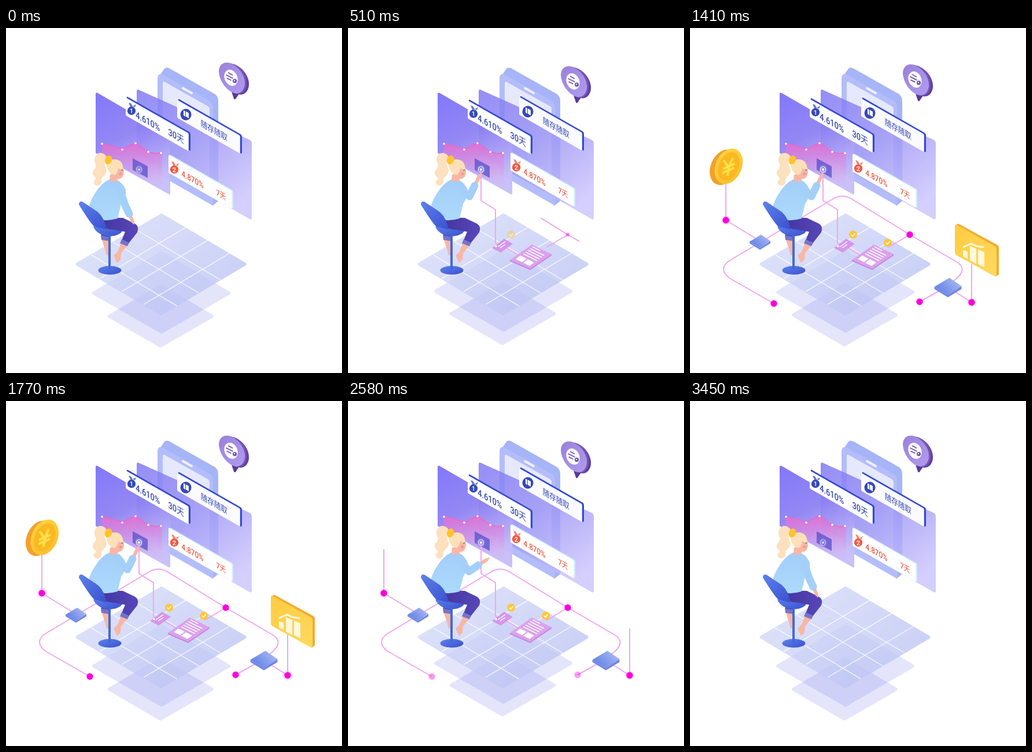
Write an HTML page that moves like this. It is 581x596 px and loops after 3480 ms.

```html
<!DOCTYPE html>
<html lang="zh">
<head>
<meta charset="utf-8">
<title>Isometric finance scene</title>
<style>
  html, body { margin: 0; width: 100%; height: 100%; overflow: hidden; background: #fff; }
  svg { display: block; width: 581px; height: 596px; }
  text { font-family: Roboto, "Noto Sans CJK SC", "Noto Sans CJK", sans-serif; font-weight: 500; }
  .line { fill: none; stroke: #f1a6ef; stroke-width: 2; stroke-linejoin: round; stroke-dasharray: 1 2; }
  .layer { fill: #747bee; stroke: #747bee; opacity: .19; stroke-linejoin: round; stroke-width: 6; }
  .dot { fill: #fb00df; }
  .halo { fill: #d84fd6; }
  .white { fill: none; stroke: #fff; }
  .blue { fill: #3549b8; }
  .red { fill: #f05b45; }
  .skin { fill: #f8b7a5; }
</style>
</head>
<body>
<svg viewBox="0 0 581 596">
  <defs>
    <linearGradient id="floor" x1="0" y1="0" x2="1" y2=".6"><stop stop-color="#d6ddfa"/><stop offset="1" stop-color="#bbc3f3"/></linearGradient>
    <linearGradient id="front" x1="0" y1="0" x2=".35" y2="1"><stop stop-color="#7b6ffa"/><stop offset=".5" stop-color="#8d80f3"/><stop offset="1" stop-color="#c5bdf8"/></linearGradient>
    <linearGradient id="back" x1="0" y1="0" x2=".7" y2="1"><stop stop-color="#7d74f3"/><stop offset=".5" stop-color="#9a92f5"/><stop offset="1" stop-color="#cbc4fc"/></linearGradient>
    <linearGradient id="pink" x1="0" y1="0" x2="0" y2="1"><stop stop-color="#e86bce" stop-opacity=".85"/><stop offset="1" stop-color="#e9a3e6" stop-opacity="0"/></linearGradient>
    <linearGradient id="bubble" x1="0" y1="0" x2="1" y2="1"><stop stop-color="#9a80dc"/><stop offset="1" stop-color="#b19cee"/></linearGradient>
    <linearGradient id="bubbleSide" x1="0" y1="0" x2="1" y2="1"><stop stop-color="#8667c9"/><stop offset="1" stop-color="#58399a"/></linearGradient>
    <linearGradient id="chip" x1="1" y1="0" x2="0" y2=".6"><stop stop-color="#b3c1f8"/><stop offset="1" stop-color="#6482e4"/></linearGradient>
    <linearGradient id="shirt" x1="0" y1="0" x2="0" y2="1"><stop stop-color="#a3cdf8"/><stop offset="1" stop-color="#acdafd"/></linearGradient>
    <linearGradient id="chair" x1="0" y1="0" x2="1" y2="1"><stop stop-color="#5c82ec"/><stop offset="1" stop-color="#3b50ce"/></linearGradient>
    <linearGradient id="pants" x1="0" y1="0" x2="1" y2="0"><stop stop-color="#42359f"/><stop offset="1" stop-color="#5846b8"/></linearGradient>
    <linearGradient id="gold" x1="0" y1="0" x2="1" y2="1"><stop stop-color="#ffd544"/><stop offset="1" stop-color="#fdbd2c"/></linearGradient>
    <linearGradient id="tile" x1="0" y1="0" x2="1" y2="1"><stop stop-color="#ffcc40"/><stop offset="1" stop-color="#ffd95f"/></linearGradient>
    <path id="balloon" d="M368 75C368 62 379 56 391 62C405 69 414 84 413 97C412 109 403 116 393 112C379 106 369 90 368 75Z"/>
    <g id="check"><circle r="7" fill="#ffc83b"/><path class="white" stroke-width="1.6" d="M-3 0l2.5 2.5 4-5"/></g>
    <g id="block">
      <path fill="#6f86e0" d="M-18 0L0 11L18 -1V3L0 14L-18 3Z"/>
      <path fill="url(#chip)" d="M-18 0L2 -12L18 -1L0 11Z"/>
    </g>
    <g id="medal">
      <path d="M-5 -14l4 1 3 5-3 3zM2 -8l6-3-2 5z" opacity=".75"/>
      <circle r="7.2"/>
    </g>
  </defs>

  <!-- floor -->
  <path class="layer" data-bob="-7" d="M268 446L356 498L267 549L179 498Z"/>
  <path class="layer" data-bob="-5" d="M269 389L385 458L269 525L152 458Z"/>
  <path fill="url(#floor)" stroke="url(#floor)" opacity=".76" stroke-linejoin="round" stroke-width="6" d="M269 323.500L412.500 408L268 493.500L123.500 408Z"/>
  <path id="grid" class="white" stroke-width="1.300" opacity=".85"/>

  <!-- phone and panels -->
  <path fill="#a6b4f8" d="M262 88L274 70Q278 67 283 70L361 114Q367 118 367 126V299L357 307L340 290Z"/>
  <path fill="#b3bdfa" d="M262 89Q262 76 272 81L351 125Q358 129 358 138V307L262 252Z"/>
  <path fill="#e6e9fd" d="M271 95Q271 92 274 93L349 135Q352 137 352 141V285L271 240Z"/>
  <path d="M306 104L321 112.500" stroke="#eef0ff" stroke-width="4" stroke-linecap="round"/>
  <path fill="url(#back)" opacity=".82" d="M226 109Q226 105 230 107L421 193Q425 195 425 199V328Q425 332 421 330L226 218Z"/>
  <path fill="url(#front)" opacity=".94" d="M155 114Q155 111 158 112L281 183Q284 185 284 188V285Q284 289 281 287L155 216Z"/>
  <path fill="url(#pink)" d="M166 200L185 204L201 209L224 198L246 214L258 217L270 215V279L166 219Z"/>
  <path fill="none" stroke="#ee67c4" stroke-width="1.500" d="M166 200L185 204L201 209L224 198L246 214L258 217L270 215"/>
  <g fill="#fff"><circle cx="166" cy="200" r="1.800"/><circle cx="201" cy="210" r="1.800"/><circle cx="224" cy="199" r="1.800"/><circle cx="246" cy="214" r="1.800"/><circle cx="268" cy="216" r="1.800"/></g>
  <path fill="#5750cb" opacity=".75" d="M219 225L245 239V259L219 245Z"/>
  <g id="button"><ellipse cx="230" cy="244.500" rx="7" ry="8" fill="#8f8bea" opacity=".6"/><ellipse class="white" cx="230" cy="244.500" rx="4.500" ry="5" stroke-width="1.200"/><circle cx="230" cy="244.500" r="2.200" fill="#fff"/></g>

  <!-- rate cards -->
  <g data-bob="-8">
    <g transform="matrix(.8 .456 0 1 296 124)">
      <rect x="2" y="-3" width="138" height="33" rx="3" fill="#3148d6"/>
      <rect width="136" height="31" rx="2" fill="#fbfbff"/>
      <text class="blue" x="51" y="22" font-size="14.400">随存随取</text>
    </g>
    <ellipse class="blue" cx="311" cy="149.500" rx="9.500" ry="10"/>
    <path fill="#fff" d="M307 142l3 2v9l-3-2zM311 144l5 3v9l-5-3z"/>
  </g>
  <g data-bob="-6">
    <g transform="matrix(.8 .456 0 1 281 219)">
      <rect x="2" y="-2" width="138" height="32" rx="3" fill="#d2eefb"/>
      <rect width="137" height="31" rx="2" fill="#fff"/>
      <g class="red"><text x="28" y="24" font-size="14.500">4.870%</text><text x="103" y="22" font-size="13.500">7天</text></g>
    </g>
    <use href="#medal" class="red" x="291" y="244.500"/>
    <text x="291" y="249" font-size="11" fill="#fff" text-anchor="middle">2</text>
  </g>
  <g data-bob="8">
    <g transform="matrix(.8 .456 0 1 207 120)">
      <rect x="2" y="-3" width="138" height="32" rx="3" fill="#3148d6"/>
      <rect width="136" height="31" rx="2" fill="#fff"/>
      <g class="blue" font-size="16"><text x="21.500" y="25">4.610%</text><text x="92" y="22.500">30天</text></g>
    </g>
    <use href="#medal" class="blue" x="217" y="143"/>
    <text x="217" y="147" font-size="11" fill="#fff" text-anchor="middle">1</text>
  </g>

  <!-- speech bubble -->
  <g data-bob="10">
    <path fill="#58399a" d="M390 110L394 122Q396 125 398 121L405 111Z"/>
    <use href="#balloon" x="7" y="2" fill="url(#bubbleSide)"/>
    <use href="#balloon" x="3" y="1" fill="#7656b8"/>
    <use href="#balloon" fill="url(#bubble)"/>
    <ellipse cx="389" cy="86" rx="11" ry="14.500" fill="#fff" transform="rotate(-24 389 86)"/>
    <path fill="none" stroke="#6d4fae" stroke-width="1.700" d="M384 77l8 4.500M380.500 81l12 6M381.500 86.500l8 4"/>
    <circle cx="395.500" cy="91.500" r="3.600" fill="#6d4fae"/><circle cx="395" cy="91" r="1.200" fill="#fff"/>
  </g>

  <!-- network -->
  <path class="line" pathLength="1" data-grow="460 910 2690 3080" d="M380 357L284 298Q264 284 246 296L68 402Q48 416 68 432L145 476"/>
  <path class="line" pathLength="1" data-grow="460 910 2690 3080" d="M380 357L461 404Q479 415 463 431L446 446L397 473"/>
  <path class="line" pathLength="1" data-grow="730 900 2690 2900" d="M121 368L62 332V256"/>
  <path class="line" pathLength="1" data-grow="730 900 2690 2900" d="M446 448L487 474V393"/>
  <use href="#block" x="121" y="369" data-fade="700 800 2740 2880"/>
  <use href="#block" transform="translate(446 447) scale(1.300)" data-fade="700 800 2740 2880"/>
  <path class="line" pathLength="1" data-grow="200 340 3080 3240" d="M230 247V298L255 314V372L262 376"/>
  <path class="line" pathLength="1" data-grow="350 400 3020 3100" d="M274 380L294 392"/>
  <path class="line" pathLength="1" data-grow="420 480 2980 3060" d="M343 379L380 357"/>
  <g data-fade="300 400 3040 3160">
    <path fill="#d597ea" d="M249 380L270 364L285 373L264 388Z"/>
    <path class="white" stroke-width="1.500" d="M259 378l13-9M263 380l9-6"/><circle cx="256" cy="377" r="1.800" fill="#fff"/>
  </g>
  <g data-fade="370 460 3000 3120">
    <path fill="#c483da" d="M280 401L318 375L352 391V393L315 418L280 403Z"/>
    <path fill="#dba2ec" d="M280 401L318 374L352 391L315 416Z"/>
    <path class="white" stroke-width="1.500" d="M319 378l13 6.500M315 381l24 12M311 384l24 12M307 387l24 12M303 390l24 12"/>
    <path fill="#fff" d="M290 399l8-6 11 5.500-8 6zM303 405.500l8-6 11 5.500-8 6z"/>
  </g>
  <use href="#check" x="282" y="357" data-fade="450 580 2960 3080"/>
  <use href="#check" x="342" y="371" data-fade="560 690 2960 3080"/>
  <g id="dots"></g>

  <!-- coin -->
  <g data-fade="890 1000 2350 2510"><g data-float>
    <g transform="rotate(24 61 234)">
      <ellipse cx="59" cy="236" rx="22.500" ry="32" fill="#f4a02b"/>
      <ellipse cx="66" cy="231" rx="22.500" ry="32" fill="url(#gold)"/>
      <ellipse cx="66" cy="231" rx="17" ry="25.500" fill="#fcb822"/>
    </g>
    <path fill="none" stroke="#ffe04a" stroke-width="4" d="M58 223L67 235L74 219M67 235L65 250M57 238L77 229M56 245L76 236"/>
  </g></g>

  <!-- chart tile -->
  <g data-fade="890 1000 2350 2510"><g data-float>
    <path fill="#f3ac30" d="M461 333L465 333L531 369Q534 371 534 374V420L529 424L462 386Z"/>
    <path fill="url(#tile)" d="M458 337Q458 333 462 335L526 371Q530 373 530 377V421Q530 425 526 423L461 387Q458 385 458 381Z"/>
    <path fill="#fff8dd" d="M472 378l8 3v12l-8-4zM484 371l11 5v26l-11-6zM498 377l11 5v26l-11-6z"/>
    <path fill="none" stroke="#fff8dd" stroke-width="3" d="M472 373L486 367L495 371L508 373"/>
  </g></g>

  <!-- person -->
  <path class="skin" d="M164 360L177 364L177 384L180 392L174 393L171 382Z"/>
  <path fill="#4a3da3" d="M163 342L182 344L179 362L165 360Z"/>
  <path fill="#7773c9" d="M164 358L179 361L178 368L165 366Z"/>
  <path fill="url(#chair)" d="M151 343Q178 332 203 346Q201 358 180 360Q157 358 151 343Z"/>
  <ellipse cx="179.500" cy="418.500" rx="20" ry="7.500" fill="url(#chair)"/>
  <path fill="#4366dc" d="M177 358H181V417H177Z"/>
  <path class="skin" d="M199 371L210 376L199 389L198 400L192 406L186 393L193 386Z"/>
  <path fill="url(#pants)" d="M160 327L202 328L223 338Q231 343 227 353L212 372L200 367L206 352L183 348Q163 347 160 327Z"/>
  <path fill="#7773c9" d="M200 365L213 371L210 377L197 372Z"/>
  <path fill="url(#shirt)" d="M178 262Q165 268 155 284Q144 300 143 312Q150 329 160 331Q178 334 193 329L199 304Q209 289 207 279Q201 266 190 262Z"/>
  <path fill="url(#chair)" d="M126 305Q126 299 132 300L159 318Q170 328 174 348L153 343Q147 339 126 305Z"/>
  <path class="skin" d="M180 253H193V263Q187 269 179 263Z"/>
  <path class="skin" d="M184 236L201 237L204 248Q204 259 195 261Q184 260 182 250Z"/>
  <path fill="#fce0b8" d="M174 233Q177 226 189 227Q202 228 203 244Q197 245 194 242Q193 252 187 254Q173 249 174 233Z"/>
  <path fill="#fde0bd" d="M174 222Q165 211 156 219Q150 227 155 235Q157 241 151 246Q148 253 153 257Q158 259 152 264Q150 269 156 272Q164 273 165 266Q163 259 171 254Q177 246 171 238Q169 229 174 222Z"/>
  <ellipse cx="177" cy="228" rx="6" ry="8" fill="#ffc42a" transform="rotate(25 177 228)"/>
  <path fill="none" stroke="#7b4d62" d="M199 246l4-1"/><circle cx="198" cy="252" r="2.500" fill="#f59891"/>
  <g fill="none" stroke-linecap="round" stroke-linejoin="round">
    <path id="hand" stroke="#f8b7a5" stroke-width="6"/>
    <path id="finger" stroke="#f8b7a5" stroke-width="3"/>
    <path id="sleeve" stroke="#a4cff9" stroke-width="13"/>
  </g>
</svg>
<script>
const LOOP = 3480, BOB = LOOP / 2, TAU = Math.PI * 2;
const $ = id => document.getElementById(id);
const all = name => [...document.querySelectorAll(`[data-${name}]`)];
const clamp = v => Math.min(1, Math.max(0, v));
const ramp = (t, a, b) => clamp((t - a) / (b - a));
const smooth = v => v * v * (3 - 2 * v);
const mix = (a, b, k) => a + (b - a) * k;
const inOut = (t, [a, b, c, d]) => ramp(t, a, b) - ramp(t, c, d);

// Floor grid, as fractions along both diamond edges
const iso = (u, v) => `${269 + 148 * (u - v)} ${320 + 88 * (u + v)}`;
$("grid").setAttribute("d", [0, .255, .51].map(k =>
  `M${iso(.28 + k, 0)}L${iso(.28 + k, 1)}M${iso(0, .31 + k)}L${iso(1, .31 + k)}`).join(""));

// x, y, visible span, first pulse
const dots = [
  [380, 357, "470 560 2980 3080", 880],
  [62, 332, "800 880 2760 2880", 1300],
  [487, 474, "800 880 2760 2880", 1300],
  [145, 476, "880 960 2520 2620", 1830],
  [397, 473, "880 960 2520 2620", 1830]
].map(([x, y, span, start]) => {
  const [halo, dot] = ["halo", "dot"].map(name => {
    const c = document.createElementNS("http://www.w3.org/2000/svg", "circle");
    c.setAttribute("class", name);
    c.setAttribute("cx", x);
    c.setAttribute("cy", y);
    return $("dots").appendChild(c);
  });
  return { halo, dot, start, span: span.split(" ").map(Number) };
});

const timed = name => all(name).map(el => [el, el.dataset[name].split(" ").map(Number)]);
const bobs = timed("bob"), fades = timed("fade"), lines = timed("grow"), floats = all("float");

function drawArm(up) {
  const ex = mix(206, 210, up), ey = mix(306, 291, up);
  const angle = mix(65, -64, up) * Math.PI / 180, length = mix(35, 43, up);
  const along = k => `${ex + Math.cos(angle) * length * k} ${ey + Math.sin(angle) * length * k}`;
  $("sleeve").setAttribute("d", `M197 279L${ex} ${ey}L${along(.48)}`);
  $("hand").setAttribute("d", `M${along(.5)}L${along(.88)}`);
  $("finger").setAttribute("d", `M${along(.8)}L${along(1)}`);
}

function draw() {
  const t = performance.now() % LOOP;
  const wave = (1 - Math.cos(TAU * t / BOB)) / 2;
  for (const [el, [size]] of bobs) el.setAttribute("transform", `translate(0 ${size * wave})`);
  for (const [el, span] of fades) el.setAttribute("opacity", inOut(t, span));
  for (const [el, span] of lines) {
    const shown = inOut(t, span);
    el.setAttribute("stroke-dashoffset", 1 - shown);
    el.setAttribute("visibility", shown > 0 ? "visible" : "hidden");
  }
  const lift = 3 * (1 - Math.cos(TAU * (t - 1010) / 960));
  for (const el of floats) el.setAttribute("transform", `translate(0 ${lift})`);
  for (const { halo, dot, start, span } of dots) {
    const shown = inOut(t, span);
    const pulse = t < start ? 1 : clamp((t - start) % 1170 / 550);
    dot.setAttribute("r", 5.7 * Math.min(1, ramp(t, span[0], span[1]) + .1));
    dot.setAttribute("opacity", shown);
    halo.setAttribute("r", 6 + 3 * Math.min(1, pulse * 2));
    halo.setAttribute("opacity", .34 * Math.sin(Math.PI * pulse) * shown);
  }
  const up = smooth(ramp(t, 30, 260)) - smooth(ramp(t, 2480, 2800));
  drawArm(up);
  $("button").setAttribute("opacity", mix(.65, 1, up));
  requestAnimationFrame(draw);
}
draw();
</script>
</body>
</html>
```
